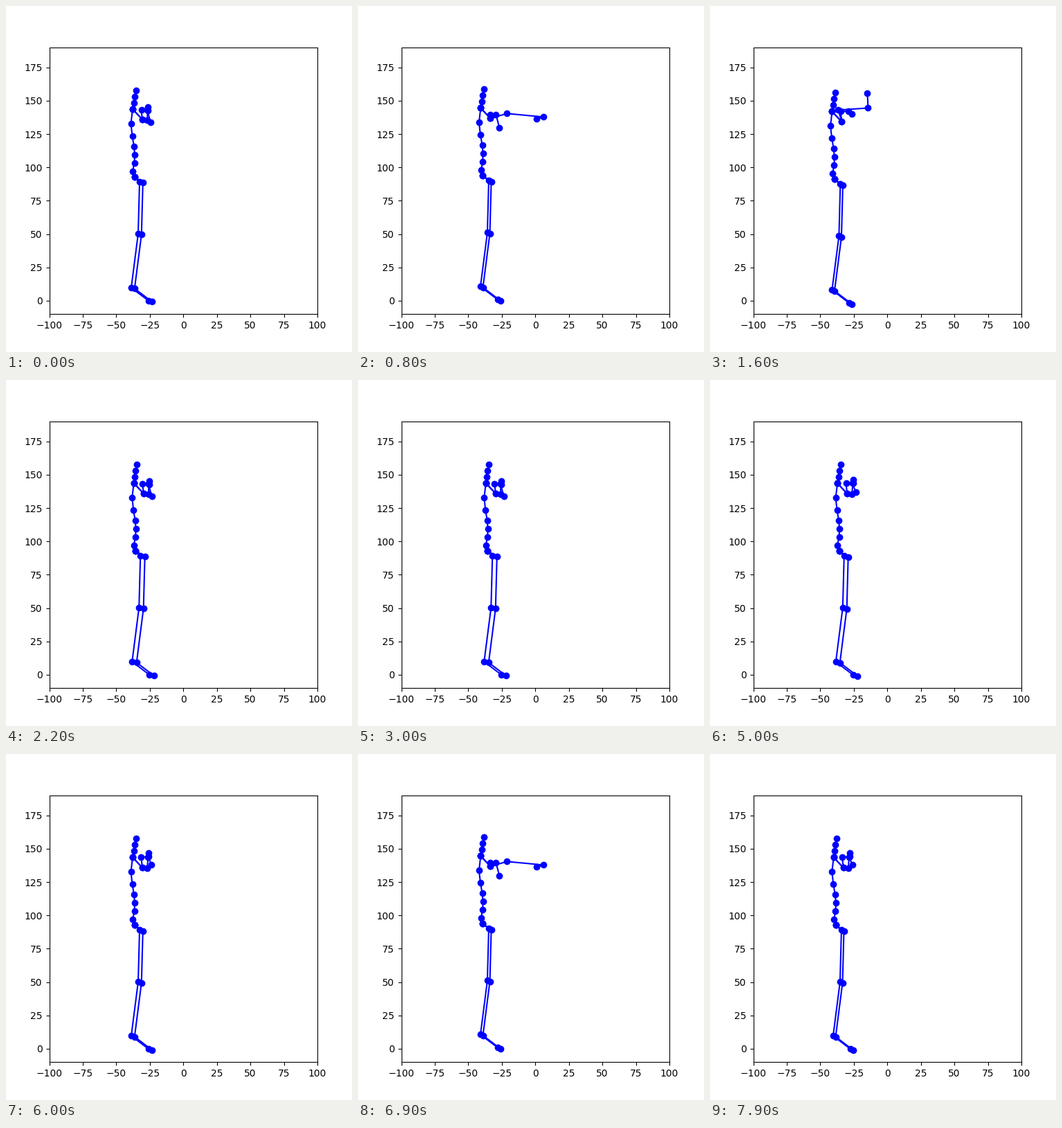
A matplotlib script for the animation above (8 s loop, 500x500 px).

```python
import numpy as np
import matplotlib.pyplot as plt
from matplotlib.animation import FuncAnimation

FRAMES, STEP = 80, 100

# Standing figure in stage pixels, y down
SPINE = np.array([(187.5, 122), (185.5, 131), (184.5, 140), (183, 149),
                  (180.5, 170), (182.5, 188), (185, 203), (186, 215),
                  (185.5, 227), (183, 238.5), (185.5, 247)])
LEG = np.array([(193, 254), (191, 329), (181, 407), (206, 426)])
NECK, COLLAR = 3, (14, 15)

# One throw: wind up, level, follow through, draw back.
# Each pose: lean x, y, idle forearm drop, then shoulder, elbow, wrist
THROW = [(-6.8, 0, 14, 15, 6, 54, -10, 46, -39),
         (-5.4, -1.6, 19, 38, 8, 91, 13, 81, 16),
         (-2.9, -2, 7, 37, 10, 88, 17, 74, 52),
         (-6.2, 3.4, 4, 9, -2, 52, -5, 51, -26)]
BEATS = np.array([0, 250, 500, 750, 1300, 1500])
STARTS = (300, 3350, 6400)


def rest(t):
    """Quiet pose, drifting slowly back and down over time."""
    drift = 1.7 * (1 - abs(t / 3000 - 1) ** 2.5)
    s = np.clip(t / 3000 - 1, 0, 1)
    return np.array([drift, 0.3 * s, 18 - 7 * s,
                     21, 16, 22 + s, -3 - 3 * s, 22 + s, 2 - 3 * s])


def spline(x, t, v):
    """Cubic through the keys, at rest at both ends."""
    m = np.gradient(v, t, axis=0)
    m[0] = m[-1] = 0
    i = min(np.searchsorted(t, x, "right") - 1, len(t) - 2)
    h = t[i + 1] - t[i]
    u = (x - t[i]) / h
    s = u * u * (3 - 2 * u)
    return (v[i] * (1 - s) + v[i + 1] * s
            + h * u * (1 - u) * ((1 - u) * m[i] - u * m[i + 1]))


def pose(t):
    for start in STARTS:
        if start <= t < start + BEATS[-1]:
            keys = np.vstack((rest(t), THROW, rest(t)))
            return spline(t - start, BEATS, keys)
    return rest(t)


def idle_arm(drop, elbow_y):
    """The other arm rises with the throwing elbow."""
    lift = 2.5 + 0.52 * elbow_y
    shoulder = np.array([12.4 + 0.15 * lift, lift])
    elbow = shoulder + (12 - 0.2 * drop, 0)
    return [shoulder, elbow, elbow + (5, drop)]


def skeleton(t):
    p = pose(t)
    dx, dy, drop = p[:3]
    arm = p[3:].reshape(3, 2)
    spine = SPINE + np.column_stack((dx * np.linspace(1.1, 0.95, len(SPINE)),
                                     np.full(len(SPINE), dy)))
    near = LEG + (0.75 * dx, dy)
    far = near + (4.8 + max(dx, -1.2), 1.3)
    neck, pelvis = spine[NECK], spine[-1]
    arms = [neck + np.vstack(((0, 0), COLLAR, a))
            for a in (idle_arm(drop, arm[1, 1]), arm)]
    return [spine, *(np.vstack((pelvis, leg)) for leg in (near, far)), *arms]


fig, ax = plt.subplots(figsize=(5, 5), dpi=100)
fig.subplots_adjust(left=0.125, right=0.9, bottom=0.11, top=0.88)
ax.set_xlim(-100, 100)
ax.set_ylim(-10, 190)
lines = [ax.plot([], [], "bo-")[0] for _ in range(5)]


def draw(i):
    for line, chain in zip(lines, skeleton(i * STEP)):
        x, y = chain.T
        line.set_data((x - 62.5) / 1.9375 - 100, (445 - y) / 1.925 - 10)
    return lines


anim = FuncAnimation(fig, draw, frames=FRAMES, interval=STEP,
                     repeat=True, repeat_delay=0)
plt.show()
```
